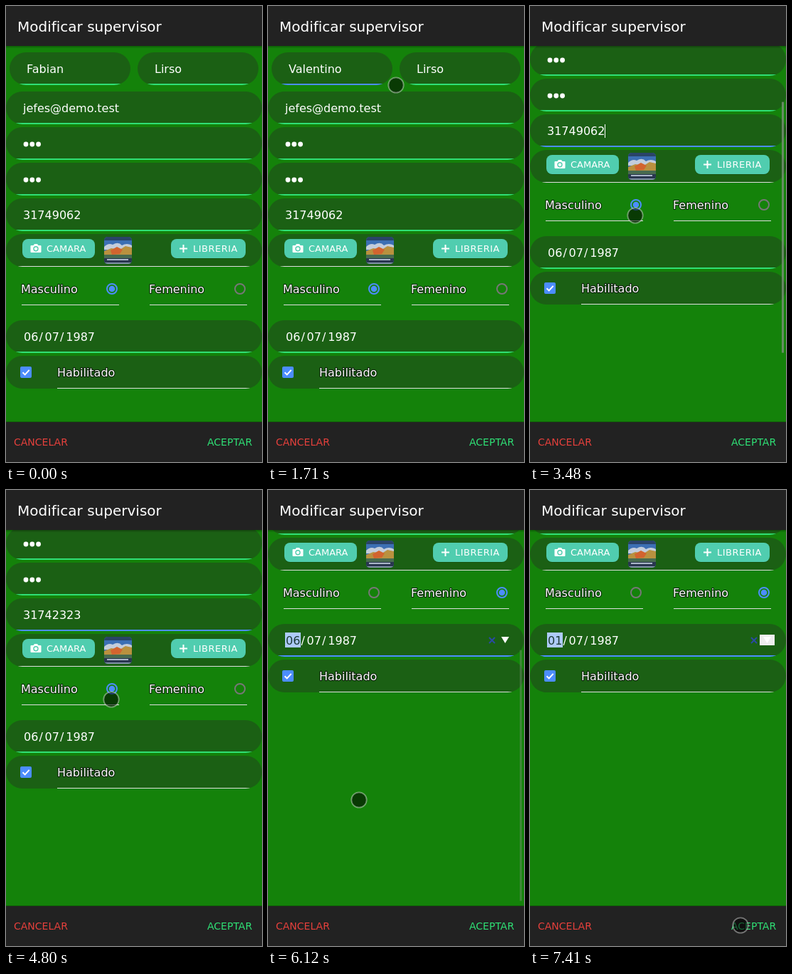
Write an HTML page that moves like this. It is 360 by 640 pixels and loops after 7.5 s.

```html
<!DOCTYPE html>
<html lang="es">
<head>
<meta charset="utf-8">
<title>Modificar supervisor</title>
<style>
html, body { margin: 0; width: 100%; height: 100%; overflow: hidden; background: #14820a; }
svg { display: block; width: 360px; height: 640px; }
text { font: 16px "DejaVu Sans", Verdana, sans-serif; fill: #fff; white-space: pre; }
.title { font-size: 20px; }
.action { font-size: 14px; }
.button { font-size: 13px; }
.label { stroke: #000; stroke-opacity: .75; stroke-width: 2px; stroke-linejoin: round; paint-order: stroke; }
</style>
</head>
<body>
<svg id="stage" viewBox="0 0 360 640" xmlns="http://www.w3.org/2000/svg"></svg>
<script>
const LOOP = 7500, STEP = 30;
const BLUE = '#4c8dff', GREEN = '#2fdf75', BAR = '#222', LINE = '#dedede';
const stage = document.getElementById('stage');

function add(parent, tag, attrs = {}, content) {
  const node = document.createElementNS('http://www.w3.org/2000/svg', tag);
  set(node, attrs);
  if (content !== undefined) node.textContent = content;
  parent.appendChild(node);
  return node;
}
function set(node, attrs) {
  for (const key in attrs) node.setAttribute(key, attrs[key]);
}
const rect = (parent, x, y, width, height, fill, rx = 0) =>
  add(parent, 'rect', { x, y, width, height, fill, rx });
const text = (parent, x, y, content, attrs = {}) =>
  add(parent, 'text', { x, y, ...attrs }, content);
const circle = (parent, cx, cy, r, attrs) => add(parent, 'circle', { cx, cy, r, ...attrs });
const show = (node, on) => node.setAttribute('visibility', on ? 'visible' : 'hidden');

const defs = add(stage, 'defs');
rect(stage, 0, 0, 360, 640, '#14820a');
const content = add(stage, 'g');

// A pill-shaped row; returns its underline so that focus can recolour it.
let clipCount = 0;
function pill(x, y, width, color = GREEN, thick = 2, inset = 14) {
  const id = 'pill' + clipCount++;
  rect(add(defs, 'clipPath', { id }), x, y, width, 46, '#000', 23);
  rect(content, x, y, width, 46, '#1b6014', 23);
  const line = rect(content, x + inset, y + 46 - thick, width - inset - 14, thick, color);
  line.setAttribute('clip-path', `url(#${id})`);
  return line;
}

function radio(x, y) {
  const ring = circle(content, x, y, 7, { fill: 'none', 'stroke-width': 2 });
  const dot = circle(content, x, y, 4.3, { fill: BLUE });
  return on => { set(ring, { stroke: on ? BLUE : '#777' }); show(dot, on); };
}

const lines = {
  first: pill(5, 65, 170),
  last: pill(185, 65, 170),
  mail: pill(0, 120, 360),
  pass: pill(0, 170, 360),
  repeat: pill(0, 220, 360),
  dni: pill(0, 270, 360)
};
pill(0, 320, 360, LINE, 1);
lines.date = pill(0, 441, 360);
pill(0, 491, 360, LINE, 1, 72);

const values = {
  first: text(content, 29, 94, ''),
  last: text(content, 209, 94, ''),
  dni: text(content, 24, 299, '')
};
text(content, 24, 149, 'jefes@demo.test');
for (const y of [194, 244])
  for (let i = 0; i < 3; i++) circle(content, 28 + i * 8.8, y, 3.4, { fill: '#fff' });

// Picture row
rect(content, 23, 328, 102, 27, '#000', 8).setAttribute('opacity', .15);
rect(content, 232, 328, 105, 27, '#000', 8).setAttribute('opacity', .15);
rect(content, 23, 327, 102, 27, '#50cdaf', 8);
rect(content, 232, 327, 105, 27, '#50cdaf', 8);
add(content, 'path', {
  d: 'M35.5 336h3l1.5-2h4l1.5 2h3q1 0 1 1v8q0 1-1 1h-13q-1 0-1-1v-8q0-1 1-1z', fill: '#fff'
});
circle(content, 42, 340.7, 3, { fill: 'none', stroke: '#50cdaf', 'stroke-width': 1.4 });
text(content, 57, 345, 'CAMARA', { class: 'button' });
add(content, 'path', { d: 'M244 340.5h11M249.5 335v11', stroke: '#fff', 'stroke-width': 2 });
text(content, 263, 345, 'LIBRERIA', { class: 'button', 'letter-spacing': .5 });

const photoClip = add(defs, 'clipPath', { id: 'photo' });
rect(photoClip, 138, 324, 39, 38, '#000', 5);
const photo = add(content, 'g', { 'clip-path': 'url(#photo)' });
rect(photo, 138, 324, 39, 38, '#3c6fb4');
rect(photo, 138, 324, 39, 5, '#2a4468');
add(photo, 'path', { d: 'M138 338q6-6 12-3q8-5 13 1q7-4 14 0v6h-39z', fill: '#c3cddb' });
add(photo, 'path', { d: 'M138 344l10-4 12 2 8-5 9 2v14h-39z', fill: '#b9913f' });
add(photo, 'path', { d: 'M147 343l9-5 8 4-4 6-11 1z', fill: '#d2642f' });
rect(photo, 138, 349, 39, 7, '#486b50');
rect(photo, 138, 354, 39, 8, '#29364f');
rect(photo, 142, 355, 30, 2, '#aab6c8');
rect(photo, 138, 360, 39, 2, '#8091a6');

// Options
text(content, 21, 403, 'Masculino', { class: 'label' });
text(content, 201, 403, 'Femenino', { class: 'label' });
rect(content, 22, 419, 137, 1, LINE);
rect(content, 202, 419, 137, 1, LINE);
const setMale = radio(149, 397), setFemale = radio(329, 397);

// Date, with the selected day and the picker controls
const selection = rect(content, 24, 453, 22, 21, '#aecbfa');
const day = text(content, 25, 470, '06');
[[46.4, '/'], [54.6, '07'], [76, '/'], [84.3, '1987']].forEach(([x, part]) => text(content, x, 470, part));
const picker = add(content, 'g');
add(picker, 'path', { d: 'M311 460l8 8M319 460l-8 8', stroke: '#2b4aa5', 'stroke-width': 2 });
const pickerBack = rect(picker, 323, 456, 21, 15, '#eee');
add(picker, 'path', { d: 'M328 459h11l-5.5 9z', fill: '#fff' });

rect(content, 20, 506, 16, 16, BLUE, 2);
add(content, 'path', { d: 'M23.5 514.2l3.2 3.2 6-6.6', fill: 'none', stroke: '#fff', 'stroke-width': 2 });
text(content, 72, 520, 'Habilitado', { class: 'label' });

const caret = rect(content, 0, 0, 1, 19, '#fff');
const thumb = rect(stage, 354, 56, 3, 352, '#7d8f7b');

// Bars
rect(stage, 0, 56, 360, 1, '#000').setAttribute('opacity', .3);
rect(stage, 0, 57, 360, 2, '#000').setAttribute('opacity', .12);
rect(stage, 0, 583, 360, 1, '#000').setAttribute('opacity', .25);
rect(stage, 0, 0, 360, 56, BAR);
rect(stage, 0, 584, 360, 56, BAR);
text(stage, 16, 36, 'Modificar supervisor', { class: 'title' });
text(stage, 11, 617, 'CANCELAR', { class: 'action', style: 'fill:#e5403c' });
text(stage, 283, 617, 'ACEPTAR', { class: 'action', style: 'fill:' + GREEN });

const pointer = circle(stage, 0, 0, 10.7, {
  fill: '#000', 'fill-opacity': .55, stroke: '#fff', 'stroke-opacity': .4, 'stroke-width': 1.8
});

// Timeline
const path = [
  [90, 346, 250], [540, 110, 92], [1590, 120, 95], [1710, 180, 111], [1860, 260, 93],
  [2850, 260, 93], [3090, 234, 188], [3210, 148, 294], [4860, 148, 294], [5160, 329, 279],
  [5310, 329, 279], [5550, 36, 346], [5820, 36, 346], [6120, 128, 435], [6330, 128, 435],
  [6480, 118, 464], [7110, 118, 464], [7410, 296, 611]
];
const focuses = [[570, 'first'], [1860, 'last'], [3210, 'dni'], [5580, 'date']];
const edits = {
  first: { from: 'Fabian', to: 'Valentino', keep: 0, erase: [900, 1110], type: [1140, 1590] },
  last: { from: 'Lirso', to: 'Cordeja', keep: 0, erase: [2010, 2220], type: [2310, 2790] },
  dni: { from: '31749062', to: '31742323', keep: 4, erase: [3990, 4200], type: [4290, 4680] }
};

const progress = (t, [start, end]) => Math.min(1, Math.max(0, (t - start) / (end - start)));
const ease = p => p * p * (3 - 2 * p);

function edited(t, { from, to, keep, erase, type }) {
  if (t < type[0]) {
    const gone = Math.ceil(progress(t, erase) * (from.length - keep));
    return from.slice(0, from.length - gone);
  }
  return to.slice(0, keep + Math.ceil(progress(t, type) * (to.length - keep)));
}

function pointerAt(t) {
  let i = 0;
  while (i < path.length - 2 && t >= path[i + 1][0]) i++;
  const [t0, x0, y0] = path[i], [t1, x1, y1] = path[i + 1];
  const p = ease(progress(t, [t0, t1]));
  return { cx: x0 + (x1 - x0) * p, cy: y0 + (y1 - y0) * p };
}

function render(now) {
  const t = Math.floor((now % LOOP) / STEP) * STEP;
  const current = focuses.filter(([start]) => t >= start).pop();
  const focus = current && current[1];

  for (const name in lines) set(lines[name], { fill: name === focus ? BLUE : GREEN });
  for (const name in edits) values[name].textContent = edited(t, edits[name]);

  const field = values[focus];
  show(caret, field && (t + 20) % 260 < 130);
  if (field) set(caret, {
    x: Math.round(+field.getAttribute('x') + field.getComputedTextLength()),
    y: field.getAttribute('y') - 15
  });

  setMale(t < 5220);
  setFemale(t >= 5220);

  const dated = focus === 'date';
  show(selection, dated);
  show(picker, dated);
  set(pickerBack, { opacity: t >= 6420 ? 1 : 0 });
  day.textContent = '0' + (6 - Math.floor(progress(t, [6540, 6930]) * 5));
  day.style.fill = dated ? '#1d3b36' : '#fff';

  const scroll = 118 * ease(progress(t, [3240, 3420])) + 135 * ease(progress(t, [5610, 5790]));
  set(content, { transform: `translate(0 ${-scroll})` });
  const sinceScroll = t < 5610 ? t - 3420 : t - 5790;
  set(thumb, {
    y: 56 + scroll * 2 / 3,
    opacity: t < 3240 ? 0 : .8 * (1 - progress(sinceScroll, [180, 480]))
  });

  set(pointer, pointerAt(t));
  show(pointer, t > 90);
}

const start = performance.now();
function tick() {
  render(performance.now() - start);
  requestAnimationFrame(tick);
}
tick();
</script>
</body>
</html>
```
